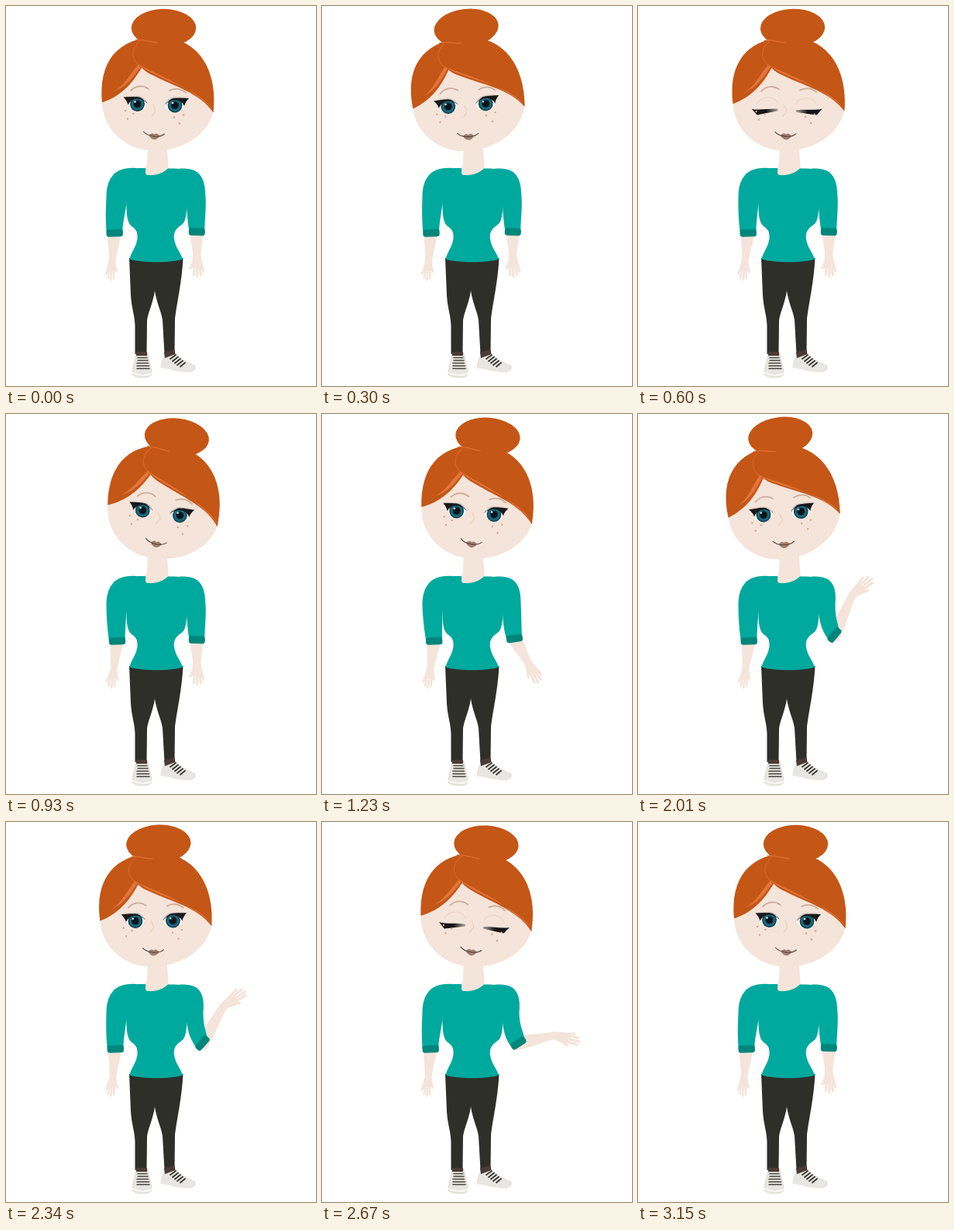
These frames come from a looping animation (400x490 px, 3.18 s). An HTML page:

```html
<!DOCTYPE html>
<html lang="en">
<head>
<meta charset="utf-8">
<title>Waving girl</title>
<style>
html, body { margin: 0; width: 100%; height: 100%; overflow: hidden; background: #fff; }
svg { display: block; width: 400px; height: 490px; }
.skin { fill: #f4e4d9; }
.hair { fill: #c45616; }
.glow { fill: #e4743a; }
.teal { fill: #00a99d; }
.cuff { fill: #00857b; }
.dark { fill: #2e2f29; }
.sock { fill: #4b3a35; }
.line { fill: none; stroke-linecap: round; stroke-linejoin: round; }
.shoe { fill: #e8e6e0; stroke: #cfccc4; stroke-width: .6; }
</style>
</head>
<body>
<svg viewBox="0 0 400 490">
  <defs>
    <linearGradient id="lash"><stop offset=".55" stop-color="#151517"/><stop offset="1" stop-color="#151517" stop-opacity=".3"/></linearGradient>
    <linearGradient id="shade" x2="0" y2="1"><stop offset="0" stop-color="#6d625c" stop-opacity="0"/><stop offset="1" stop-color="#4c4542" stop-opacity=".75"/></linearGradient>
    <radialGradient id="iris"><stop offset=".4" stop-color="#0d3441"/><stop offset=".7" stop-color="#1d7288"/><stop offset="1" stop-color="#0e303b"/></radialGradient>
    <g id="open">
      <path d="M-17 -8C-10 -14 6 -15 13 -1L0 -6Z" fill="url(#shade)"/>
      <ellipse rx="12" ry="8.5" fill="#fbf9f7"/>
      <circle r="9.4" fill="url(#iris)"/>
      <circle r="4.6" fill="#0b141a"/>
      <path d="M-18 -9L-6 -9.5C2 -10 9 -6 13 -1C8 -6 2 -7.5 -3 -6.5C-9 -5 -11 -1 -12 1C-13 -3 -15 -6 -18 -9Z" fill="#19191b"/>
    </g>
    <g id="shut">
      <path class="line" d="M-14 -1C-10 -12 8 -13 13 -2" stroke="#ead5c4"/>
      <path d="M-21 4.5C-12 7 4 4 13 5.5V8C4 9.500 -4 11 -14 12.500Z" fill="url(#lash)"/>
    </g>
    <path id="arm" class="skin" d="M-8.700 -3H8.700C8.700 12 5 20 5 32H-5C-5 20 -8.700 12 -8.700 -3Z"/>
    <g id="hand">
      <path class="skin" d="M-5 -1.500H5C5 3 7.500 7 6.500 15L-5.500 16C-8 10 -5 4 -5 -1.500Z"/>
      <path class="line" d="M-4 6L-8 16M-3.500 12L-4 25M0 12L.5 27M3.500 12L5 25M5 8L8.500 20" stroke="#f4e4d9" stroke-width="3.200"/>
    </g>
  </defs>

  <path class="skin" d="M183 176L182 204L178 212L184 221H203L210 211L207 176Z"/>

  <path class="dark" d="M159 325L161 373C162 390 166 398 166.500 412V449H181.500L182 405C184 393 190 382 192 367C194 382 200 393 202 405L204.500 449H217.500L218 403C221 380 227 355 228.500 325Z"/>

  <path class="shoe" d="M168 448C167 458 163 465 163 474C163 480 187 481 188 475C188 465 184 458 183.500 448Z"/>
  <path class="sock" d="M168 446H182V451H168Z"/>
  <path class="line" d="M170 453.500H182M170 457H183M169 460.500H183.500M169 464H184.500M169 467.500H185" stroke="#45443f" stroke-width="1.500"/>
  <path class="line" d="M163.500 473C171 477 181 477 188 474" stroke="#f8f7f3" stroke-width="2"/>
  <path class="shoe" d="M204 451C203 457 200 460 200 467C212 467 224 473 236 472C242 471 245 468 244 464C235 460 225 456 218 448Z"/>
  <path class="sock" d="M204 446L217.500 443L218.500 449L205 454Z"/>
  <path class="line" d="M212 455L219 450M215 458L222 452.500M218 460.500L225 455M221 463L228 457.500M225 465L231 460" stroke="#35342f" stroke-width="1.800"/>
  <path class="line" d="M200.500 467C212 468 224 474 236 472" stroke="#f8f7f3" stroke-width="1.600"/>

  <g id="foreL"><use href="#arm"/><use href="#hand" transform="translate(0 31) scale(.85 1)"/></g>
  <use href="#arm" id="foreR"/>
  <use href="#hand" id="handR"/>
  <path class="teal" id="sleeveL"/>
  <path class="teal" id="sleeveR"/>
  <path class="teal" d="M180 209C181 213 178 217 183 218C194 219 203 215 209 209.500C222 209 232 211 238 213L236 250C232 259 234 275 228 281C218 288 216 292 217 301C219 312 225 317 228 326.500C212 331.500 177 331.500 159.500 326.500C162 316 168 311 169.500 300C170 291 168 288 162 284C155 278 156 265 155 252L146 214C156 209 168 209 180 209Z"/>
  <rect class="cuff" id="cuffL" x="-10.700" y="-4.500" width="21.400" height="9.500" rx="3.500"/>
  <rect class="cuff" id="cuffR" x="-10.500" y="-4.500" width="21" height="9.500" rx="3.500"/>

  <g id="head">
    <path class="skin" d="M124 118C122 158 154 186.500 191 186.500C233 187 265 161 268 132L215 75L170 70Z"/>
    <path class="hair" d="M124 124.500C119 72 144 40 197 40C246 40 274 80 267.700 137.500C250 112 218 104 190 89.500C183 86.500 178 83 175 79.500C166 95 152 115 124 124.500Z"/>
    <path class="glow" d="M139 110C153 103 161 86 171 75L174 78C164 92 156 104 139 110Z"/>
    <path class="glow" d="M168 73C186 86 228 97 267 133C246 108 214 100 188 86C181 83 176 79 168 73Z"/>
    <path class="line" d="M173 45C162 54 160 66 171 76" stroke="#da682b"/>
    <ellipse class="hair" cx="203.500" cy="28.300" rx="41.700" ry="24.500"/>
    <path class="line" d="M167 44C178 42 184 47 195 47" stroke="#df6f32" stroke-width="1.300"/>

    <path class="line" d="M161 109C168 102 177 102 184 107M211 109C219 105 227 107 232 112" stroke="#cfae9c" stroke-width="1.800"/>
    <g id="eyesOpen">
      <use href="#open" transform="translate(169.500 126.500)"/>
      <use href="#open" transform="translate(218 128) scale(-1 1)"/>
      <g fill="#d9edf0"><circle cx="166.500" cy="123.500" r="1.300"/><circle cx="215" cy="125" r="1.300"/></g>
    </g>
    <g id="eyesShut">
      <use href="#shut" transform="translate(169 127)"/>
      <use href="#shut" transform="translate(218 129) scale(-1 1)"/>
    </g>
    <path class="line" d="M190 127C191 134 197 133 188 142" stroke="#ecd0b9" stroke-width="1.200"/>
    <g fill="#d5a68c">
      <circle cx="154" cy="135" r="1.200"/><circle cx="164.500" cy="139" r="1.200"/><circle cx="157" cy="145.500" r="1.200"/>
      <circle cx="217" cy="143.500" r="1.200"/><circle cx="229" cy="140.500" r="1.200"/><circle cx="224" cy="151.500" r="1.200"/>
    </g>
    <path d="M184.500 167C187 163.500 189.500 163.500 191.500 165.500C193.500 163.500 196 164.500 198.500 167.500C195 174 188 174 184.500 167Z" fill="#a17f6d"/>
    <path class="line" d="M177.500 162C183 168.500 198 170.500 204.500 165" stroke="#55443d" stroke-width="1.100"/>
  </g>
</svg>
<script>
const LOOP = 3180, STEP = 30;
const $ = id => document.getElementById(id);
const set = (id, value, name = 'transform') => $(id).setAttribute(name, value);
const rad = deg => deg * Math.PI / 180;

// key times (ms) and values
const tilt = [[0, 0], [330, -6.3], [600, -1.4], [930, 6], [1230, 3.7], [1500, -.9], [1620, -4.3],
  [1830, -9], [2010, -7], [2160, -5.3], [2670, 3], [2820, 4.2], [3150, 0], [LOOP, 0]];
const raise = [[0, 0], [1080, 0], [1230, 29], [1500, 112], [1650, 149], [1830, 158], [2010, 156],
  [2340, 150], [2670, 102], [2940, 18], [3090, 0], [LOOP, 0]];
const sway = [[0, 0], [600, 2], [1230, 4.5], [1500, 6], [2010, 3], [2670, 0], [LOOP, 0]];
const blinks = [[540, 690], [2610, 2760]];

// smooth curve through the keys, level at every peak
function curve(keys, t) {
  const slope = i => (keys[i + 1][1] - keys[i][1]) / (keys[i + 1][0] - keys[i][0]);
  const tangent = i => {
    if (i < 1 || i > keys.length - 2) return 0;
    const a = slope(i - 1), b = slope(i);
    return a * b <= 0 ? 0 : 2 * a * b / (a + b);
  };
  let i = 0;
  while (i < keys.length - 2 && t >= keys[i + 1][0]) i++;
  const [t0, a] = keys[i], [t1, b] = keys[i + 1], d = t1 - t0, u = (t - t0) / d, v = 1 - u;
  return a * v * v * (1 + 2 * u) + b * u * u * (3 - 2 * u)
    + d * u * v * (v * tangent(i) - u * tangent(i + 1));
}

function draw(t) {
  set('head', `rotate(${curve(tilt, t)} 195 190)`);
  const shut = blinks.some(([from, to]) => t >= from && t < to);
  $('eyesOpen').style.display = shut ? 'none' : '';
  $('eyesShut').style.display = shut ? '' : 'none';

  const s = curve(sway, t);
  set('foreL', `translate(${139.5 + s} 295) rotate(${4 + .65 * s}) scale(-.95 1)`);
  set('cuffL', `translate(${140.2 + s} 292.5) rotate(-2)`);
  set('sleeveL', `M168 209C140 207 130 222 129.500 246C${128.500 + s * .3} 262 ${128.500 + s * .7} 276 ${129.500 + s} 291
    L${150.500 + s} 291C${150.500 + s} 276 155 266 155.500 250Z`, 'd');

  const a = curve(raise, t), k = Math.min(1, a / 100);
  const x = 246.3 + 7 * k, y = 291 - 6 * k, lean = .34 * a;
  const dx = 10 * Math.cos(rad(lean)), dy = 10 * Math.sin(rad(lean));
  // the forearm stretches as it lifts and the wrist trails behind
  const stretch = 1 + .0052 * a, reach = 31 * stretch;
  set('foreR', `translate(${x} ${y}) rotate(${-a}) scale(1 ${stretch})`);
  set('handR', `translate(${x + reach * Math.sin(rad(a))} ${y + reach * Math.cos(rad(a))}) rotate(${27 * k * k - a}) scale(1 ${1 + .22 * k})`);
  set('cuffR', `translate(${x} ${y}) rotate(${2 - lean})`);
  set('sleeveR', `M222 210C250 207 257 221 ${257.500 - 3 * k} 246C${258.500 - 4 * k} 260 ${x + dx - 3 * k} ${y - dy - 12} ${x + dx} ${y - dy}
    L${x - dx} ${y + dy}C${x - dx - 1 - 7 * k} ${y + dy - 10} 233 270 233 250Z`, 'd');
}

const start = performance.now();
function tick() {
  const t = (performance.now() - start) % LOOP;
  draw(Math.floor(t / STEP) * STEP);
  requestAnimationFrame(tick);
}
tick();
</script>
</body>
</html>
```
